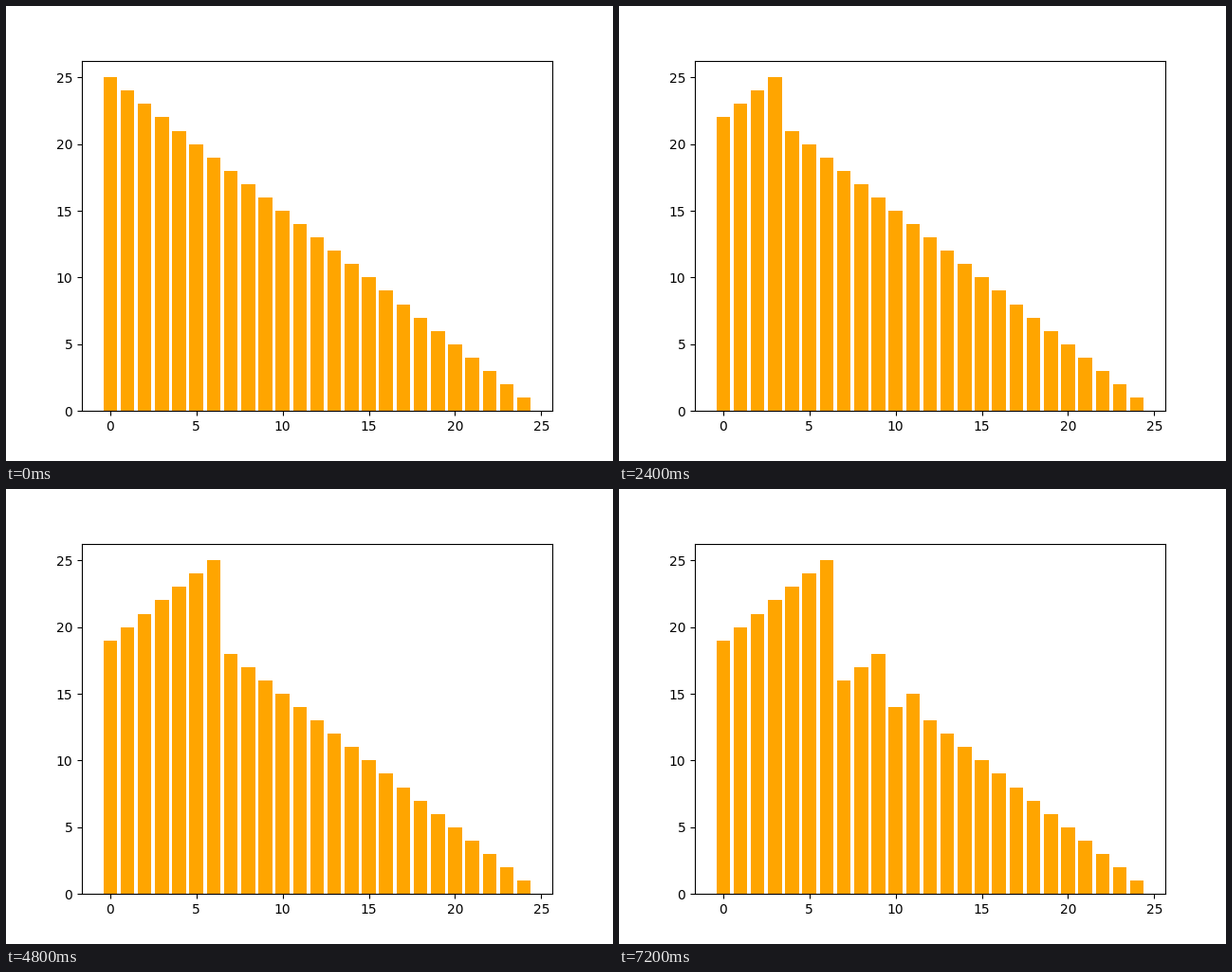
These frames come from a looping animation (640x480 px, 8000 ms). A matplotlib script:

```python
import matplotlib.pyplot as plt
from matplotlib.animation import FuncAnimation

COUNT = 25
FRAMES = 10
INTERVAL = 800


def merge_sort(values, lo, hi):
    """Sort values[lo..hi] in place, yielding a copy after every merge."""
    if lo >= hi:
        return
    mid = (lo + hi) // 2
    yield from merge_sort(values, lo, mid)
    yield from merge_sort(values, mid + 1, hi)
    values[lo:hi + 1] = sorted(values[lo:hi + 1])
    yield values.copy()


start = list(range(COUNT, 0, -1))
steps = [start, *merge_sort(start.copy(), 0, COUNT - 1)][:FRAMES]

fig, ax = plt.subplots(figsize=(6.4, 4.8), dpi=100)
bars = ax.bar(range(COUNT), start, color="orange")


def update(frame):
    for bar, height in zip(bars, steps[frame]):
        bar.set_height(height)
    return bars


anim = FuncAnimation(fig, update, frames=FRAMES, interval=INTERVAL,
                     repeat=True, repeat_delay=0, blit=False)
plt.show()
```
